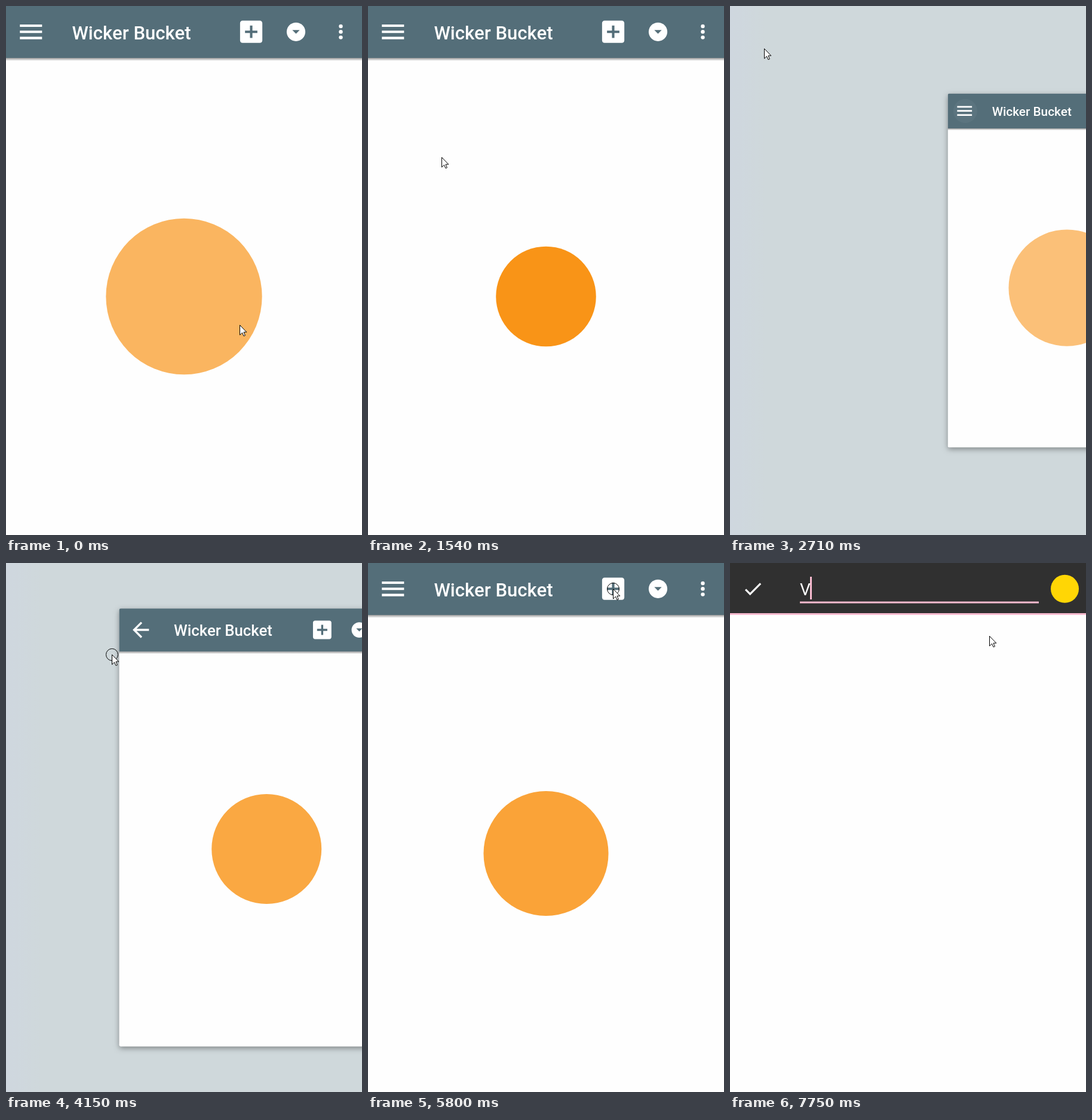
Animation, 596 px wide and 886 px high, one loop 8 s. Source, as an HTML page with a canvas:

```html
<!DOCTYPE html>
<html lang="en">
<head>
<meta charset="utf-8">
<title>Drawer and editor</title>
<style>
  html, body { margin: 0; width: 100%; height: 100%; overflow: hidden; background: #fefefe; }
  canvas { display: block; }
</style>
</head>
<body>
<canvas id="stage" width="596" height="886"></canvas>
<script>
const W = 596, H = 886, LOOP = 8000;
const ctx = document.getElementById('stage').getContext('2d');

const ICONS = {
  menu: 'M3 18h18v-2H3v2zm0-5h18v-2H3v2zm0-7v2h18V6H3z',
  back: 'M20 11H7.83l5.59-5.59L12 4l-8 8 8 8 1.41-1.41L7.83 13H20v-2z',
  add: 'M19 3H5c-1.11 0-2 .9-2 2v14c0 1.1.89 2 2 2h14c1.1 0 2-.9 2-2V5c0-1.1-.9-2-2-2zm-2 10h-4v4h-2v-4H7v-2h4V7h2v4h4v2z',
  check: 'M9 16.17L4.83 12l-1.42 1.41L9 19 21 7l-1.41-1.41z',
  triangle: 'M8 10h8l-4 4z'
};
for (const name in ICONS) ICONS[name] = new Path2D(ICONS[name]);
const POINTER = new Path2D('M.5.5V17L4.5 13.2 7 18.8 9.4 17.8 7 12.2H11.8z');

// Pointer stops: time, x, y
const STOPS = [
  [0, 391, 534], [250, 391, 534], [1540, 123, 253], [1660, 123, 224], [2350, 36, 44],
  [2500, 36, 44], [2710, 57, 71], [3340, 26, 29], [4030, 177, 153], [4210, 177, 153],
  [4880, 498, 67], [5050, 497, 66], [5780, 410, 43], [5940, 410, 43], [6260, 406, 139],
  [6600, 406, 139], [6870, 434, 122], [LOOP, 434, 122]
];
const TAPS = [2400, 4050, 5800], TAP_TIME = 150;
const OPEN_AT = 2482, CLOSE_AT = 4098, SLIDE_TIME = 420, OPEN_LEFT = 372;
const EDITOR_AT = 5910, TYPED_AT = 7750;

const clamp = v => Math.min(1, Math.max(0, v));
const settle = (t, start) => 1 - (1 - clamp((t - start) / SLIDE_TIME)) ** 5;

function rect(x, y, w, h, color) {
  ctx.fillStyle = color;
  ctx.fillRect(x, y, w, h);
}

function disc(x, y, r, color) {
  ctx.fillStyle = color;
  ctx.beginPath();
  ctx.arc(x, y, r, 0, 2 * Math.PI);
  ctx.fill();
}

function icon(name, x, y, scale, color = '#fff') {
  ctx.save();
  ctx.translate(x, y);
  ctx.scale(scale, scale);
  ctx.translate(-12, -12);
  ctx.fillStyle = color;
  ctx.fill(ICONS[name]);
  ctx.restore();
}

function text(str, x, y, font, color) {
  ctx.font = font + ' Roboto, sans-serif';
  ctx.fillStyle = color;
  ctx.fillText(str, x, y);
}

function ripple(x, y, age) {
  if (age < 0 || age > 420) return;
  const alpha = 0.16 * (1 - age / 420);
  disc(x, y, 30 * clamp(0.3 + age / 180), `rgba(255,255,255,${alpha})`);
}

function drawBackdrop() {
  const g = ctx.createLinearGradient(0, 0, 60, 0);
  g.addColorStop(0, '#cfd7df');
  g.addColorStop(1, '#cfd8db');
  rect(0, 0, W, H, g);
}

function drawPulse(t) {
  const wave = (1 - Math.cos(2 * Math.PI * (t - 1200) / 3830)) / 2;
  ctx.globalAlpha = 1 - wave / 2;
  disc(298, 486.5, 78 + 76 * wave, '#f9900e');
  ctx.globalAlpha = 1;
}

function drawHome(t) {
  const left = OPEN_LEFT * (settle(t, OPEN_AT) - settle(t, CLOSE_AT));
  const scale = 1 - left * 9.08e-4;
  const corner = left > 0.5 ? 3 : 0;
  const arrow = t > OPEN_AT + SLIDE_TIME && t < CLOSE_AT + SLIDE_TIME;

  ctx.save();
  ctx.translate(left, H * (1 - scale) / 2);
  ctx.scale(scale, scale);

  ctx.save();
  if (corner) {
    ctx.shadowColor = 'rgba(0,0,0,.38)';
    ctx.shadowBlur = 10;
    ctx.shadowOffsetY = 3;
  }
  ctx.fillStyle = '#fefefe';
  ctx.beginPath();
  ctx.roundRect(0, 0, W, H, corner);
  ctx.fill();
  ctx.restore();

  drawPulse(t);

  const shade = ctx.createLinearGradient(0, 87, 0, 92);
  shade.addColorStop(0, 'rgba(0,0,0,.4)');
  shade.addColorStop(1, 'rgba(0,0,0,0)');
  rect(0, 87, W, 5, shade);
  ctx.fillStyle = '#546e79';
  ctx.beginPath();
  ctx.roundRect(0, 0, W, 87, [corner, corner, 0, 0]);
  ctx.fill();

  ripple(43.5, 43.5, t - 2400);
  if (arrow) icon('back', 43.7, 43.3, 2.06);
  else icon('menu', 41.8, 43.3, 2.06);
  text('Wicker Bucket', 110.5, 55.5, '500 31.1px', '#fff');
  ripple(410.5, 43.2, t - 5860);
  icon('add', 410.5, 43.2, 2.07);
  disc(485.5, 43.3, 15.6, '#fff');
  icon('triangle', 485.5, 43.3, 1.55, '#546e79');
  for (const dy of [-9.3, 0, 9.3]) disc(560.5, 43.3 + dy, 3.2, '#fff');
  ctx.restore();
}

function drawEditor(t) {
  const pink = '#f8bbd0', typed = t >= TYPED_AT;
  const caretOn = t < 6330 || (t >= 6830 && t < 7320) || typed;
  ctx.globalAlpha = clamp((t - EDITOR_AT) / 130);
  rect(0, 0, W, H, '#fefefe');
  rect(0, 0, W, 84, '#303030');
  rect(0, 84, W, 3, pink);
  icon('check', 38.3, 43.3, 1.55);
  text(typed ? 'V' : 'Title', 117, 53.5, '400 28px', typed ? '#fff' : '#989898');
  rect(117, 64.5, 400, 3, pink);
  if (caretOn) rect(typed ? 134 : 117, 23, 3, 38, pink);
  disc(560.5, 43.3, 23.5, '#ffd605');
  ctx.globalAlpha = 1;
}

function drawPointer(t) {
  const i = STOPS.findIndex(s => s[0] > t);
  const [t0, x0, y0] = STOPS[i - 1], [t1, x1, y1] = STOPS[i];
  const u = (t - t0) / (t1 - t0), e = u * u * (3 - 2 * u);
  const x = Math.round(x0 + (x1 - x0) * e), y = Math.round(y0 + (y1 - y0) * e);
  ctx.lineWidth = 1;
  ctx.strokeStyle = '#000';
  if (TAPS.some(tap => t >= tap && t < tap + TAP_TIME)) {
    ctx.beginPath();
    ctx.arc(x + 0.5, y + 0.5, 10, 0, 2 * Math.PI);
    ctx.stroke();
  }
  ctx.save();
  ctx.translate(x, y);
  ctx.fillStyle = '#fff';
  ctx.fill(POINTER);
  ctx.stroke(POINTER);
  ctx.restore();
}

function draw() {
  const t = performance.now() % LOOP;
  drawBackdrop();
  drawHome(t);
  if (t >= EDITOR_AT) drawEditor(t);
  drawPointer(t);
  requestAnimationFrame(draw);
}
draw();
</script>
</body>
</html>
```
